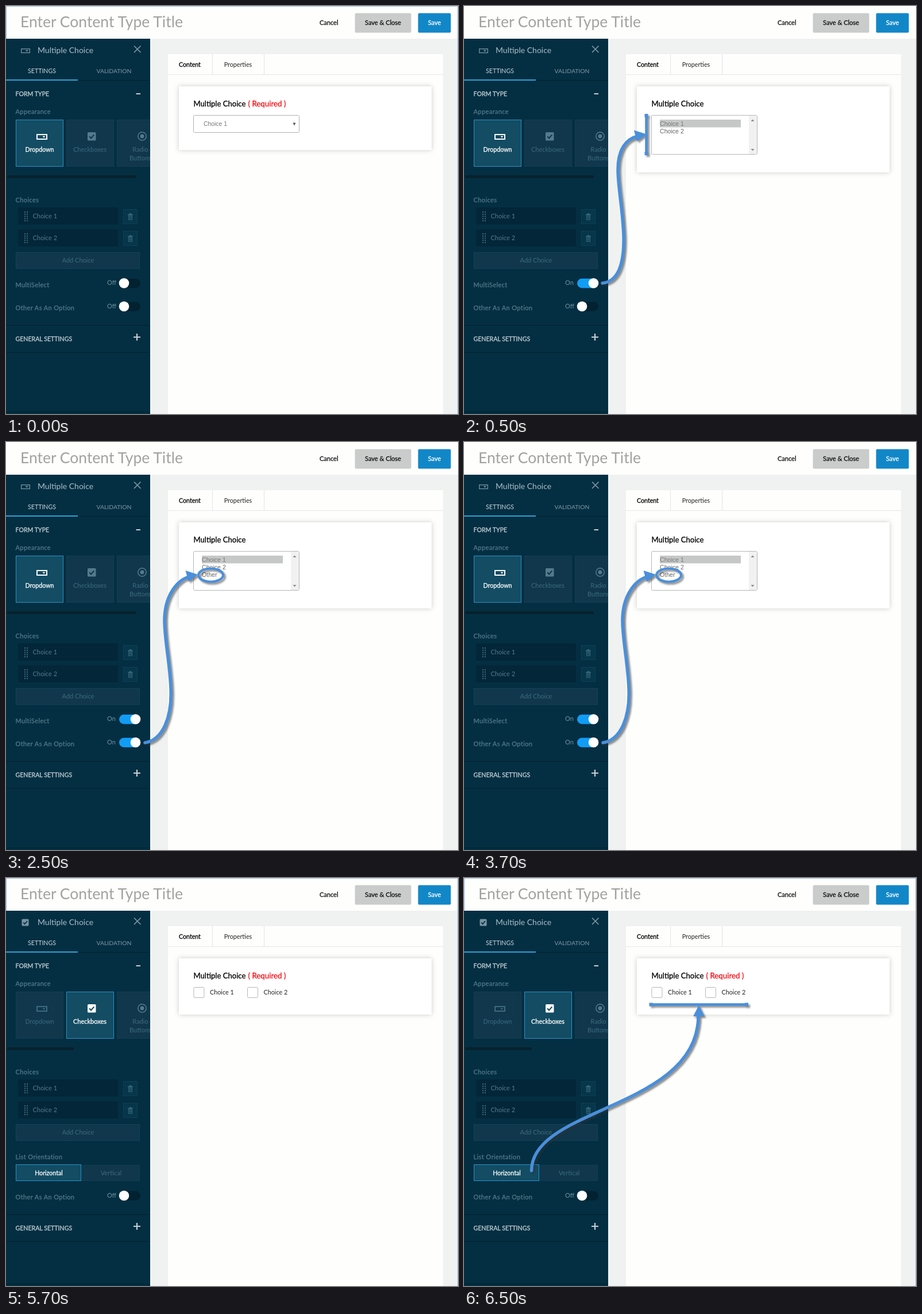
Write an HTML page that moves like this. It is 787x711 px and loops after 8 s.

```html
<!DOCTYPE html>
<html lang="en">
<head>
<meta charset="utf-8">
<title>Multiple choice settings</title>
<style>
html, body { margin: 0; width: 100%; height: 100%; overflow: hidden; background: #f0f2f1; }
svg { display: block; width: 787px; height: 711px; }
text { font-family: Lato, "Open Sans", sans-serif; font-size: 11px; }
.mid { text-anchor: middle; }
.semi { stroke-width: .3px; }
.label { letter-spacing: .4px; fill: #547b8d; stroke: #547b8d; stroke-width: .25px; }
.caps { font-size: 10.6px; }
.arial { font-family: "Liberation Sans", Arial, sans-serif; font-size: 10.6px; }
.mark { fill: none; stroke: #4a8fdb; stroke-width: 5.5; stroke-linecap: round; filter: drop-shadow(3px 3px 1.5px rgba(50, 50, 50, .55)); }
.mark .solid { fill: #4a8fdb; stroke: none; }
.mark .bar { stroke-width: 4.5; }
.card { filter: drop-shadow(0 0 4px rgba(0, 0, 0, .2)); }
</style>
</head>
<body>
<svg id="stage" viewBox="0 0 787 711" xmlns="http://www.w3.org/2000/svg"></svg>
<script>
const stage = document.getElementById('stage');
const starts = [0, 500, 2500, 4500, 6500];
const loop = 8000;

const side = '#042f42', deep = '#032738', tile = '#10374b', dim = '#3d6a80', pale = '#c3d0d6';
const picked = '#134c63', edge = '#2792ca';

const rect = (x, y, w, h, fill, more = '') =>
  `<rect x="${x}" y="${y}" width="${w}" height="${h}" fill="${fill}" ${more}/>`;
const path = (d, stroke, width = 1, fill = 'none') =>
  `<path d="${d}" stroke="${stroke}" stroke-width="${width}" fill="${fill}"/>`;
const text = (x, y, s, fill, cls = '', size = 0) =>
  `<text x="${x}" y="${y}" fill="${fill}" class="${cls}"` +
  (cls.includes('semi') ? ` stroke="${fill}"` : '') +
  (size ? ` style="font-size:${size}px"` : '') + `>${s}</text>`;
const label = (y, s) => text(16.5, y, s, dim, 'label');
// Shown only in the listed scenes
const on = (scenes, body) => `<g data-on="${scenes}">${body}</g>`;

const dropIcon = (x, y, w, h, c, lw) =>
  rect(x, y, w, h, 'none', `stroke="${c}" stroke-width="${lw}"`) +
  `<path d="M${x + w - 7.5} ${y + h / 2 - 1.3}h5l-2.5 3z" fill="${c}"/>`;
const checkIcon = (x, y, s, box, tick) =>
  rect(x, y, s, s, box, 'rx="1.5"') +
  path(`M${x + s * .22} ${y + s * .5}l${s * .2} ${s * .22}l${s * .36} ${-s * .42}`, tick, s / 7);

function tileBox(x, active) {
  return rect(x + .5, 198.5, 82, 81, active ? picked : tile,
    `stroke="${active ? edge : '#133e54'}"`);
}

function tiles(pick) {
  const a = pick === 0, b = pick === 1;
  const ca = a ? '#fff' : dim, cb = b ? '#fff' : dim;
  return tileBox(17, a) + tileBox(105, b) +
    dropIcon(54, 224, 17, 8, ca, 2) +
    text(58.5, 254, 'Dropdown', ca, 'mid' + (a ? ' semi' : ''), 10.7) +
    checkIcon(142, 220, 14.5, b ? '#fff' : '#547b8d', b ? picked : tile) +
    text(146, 254, 'Checkboxes', cb, 'mid' + (b ? ' semi' : '')) +
    rect(2, 295, a ? 224 : 116, 5, '#07212d', 'rx="2"');
}

function choiceRow(y, s) {
  let dots = '';
  for (let i = 0; i < 10; i++)
    dots += rect(32 + i % 2 * 4, y + 7 + (i >> 1) * 3.8, 2, 2, dim);
  return rect(21, y, 174, 30, deep, 'rx="2"') + dots +
    text(46.5, y + 18.5, s, '#547b8d') +
    rect(204.5, y + 3.5, 24, 25, '#06364a', 'stroke="#113e53"') +
    path(`M212 ${y + 12.5}h9M215 ${y + 11}h3`, dim, 1.3) +
    path(`M213.5 ${y + 14}v7.5h6v-7.5zM215.5 ${y + 15}v5M217.5 ${y + 15}v5`, dim, 1);
}

const toggle = (y, state) =>
  text(176, y + 3, state ? 'On' : 'Off', '#6f92a1') +
  rect(197, y - 8, 37, 16.5, state ? '#119df5' : '#022231', 'rx="8.2"') +
  `<circle cx="${state ? 225.5 : 205.5}" cy="${y}" r="8.8" fill="#fefefe"/>`;

const general = y =>
  path(`M0 ${y + .5}H250M0 ${y + 47.5}H250`, '#02202e') +
  text(16.5, y + 28, 'GENERAL SETTINGS', pale, 'caps semi') +
  path(`M222 ${y + 21}h12M228 ${y + 15}v12`, pale, 2.2);

const card = h => rect(301, 140, 440, h, '#fff', 'class="card"');
const arrow = (line, head) => `<path d="${line}"/><path class="solid" d="${head}z"/>`;
const square = (x, y) => rect(x - 3, y - 3, 6, 6, '', 'class="solid"');

const header =
  rect(0, 0, 787, 57, '#fefefd') +
  text(25, 37, 'Enter Content Type Title', '#a2a3a0', '', 26.5) +
  text(546, 33, 'Cancel', '#111', 'semi') +
  rect(607.5, 12.5, 98, 34, '#cacccb', 'rx="2"') +
  text(656.5, 33, 'Save &amp; Close', '#111', 'mid semi') +
  rect(717.5, 12.5, 57, 34, '#1287c8', 'rx="2"') +
  text(746, 33, 'Save', '#fff', 'mid semi');

const main =
  rect(0, 57, 787, 654, '#f0f2f1') +
  rect(281, 84, 480, 627, '#fefefd') +
  rect(280.5, 84, 1, 627, '#e8eae9') +
  path('M281 119.5H761M359.5 84V119M449.5 84V119', '#e3e5e4') +
  rect(281, 119, 79, 1, '#e8eae9') +
  text(320, 105.5, 'Content', '#000', 'mid semi', 10.6) +
  text(404, 105.5, 'Properties', '#222', 'mid', 10.7);

const heading = text(326.5, 175, 'Multiple Choice', '#000', 'semi', 13.1);
const required = text(421.5, 175, '( Required )', '#f20d14', 'semi', 13.3);

const selectBox = card(111) +
  rect(326.5, 190.5, 184, 30, '#fff', 'stroke="#b0b2b1" rx="2"') +
  text(344, 209, 'Choice 1', '#777', 'arial', 10.4) +
  '<path d="M499.5 203.5h5l-2.5 5z" fill="#555"/>';

const listBox = card(150) +
  rect(326.5, 190.5, 184, 68, '#fff', 'stroke="#b5b7b6" rx="2"') +
  rect(496, 191, 14, 67, '#f0f1f0') +
  '<path d="M499.5 201h6l-3-3.5zM499.5 249h6l-3 3.5z" fill="#8b8d8c"/>' +
  rect(341, 198, 141, 13.5, '#c6c8c7') +
  text(341, 208.5, 'Choice 1', '#777', 'arial') +
  text(341, 221.5, 'Choice 2', '#666', 'arial');

const checkItem = (x, s) =>
  rect(x + .5, 190.5, 18, 18, '#fff', 'stroke="#b5b7b6" rx="2"') +
  text(x + 28.5, 203, s, '#222', '', 10.8);

const sidebar =
  rect(0, 57, 251, 654, side) +
  text(55, 82, 'Multiple Choice', '#a9bec7', '', 14) +
  path('M223 69.5l11.5 11.5M234.5 69.5l-11.5 11.5', '#7f98a4', 1.7) +
  text(62.5, 117, 'SETTINGS', '#c7d6dc', 'caps mid') +
  text(188, 117, 'VALIDATION', '#7d99a6', 'caps mid', 10.4) +
  rect(125, 129, 125, 1, '#02202e') +
  rect(0, 128, 125, 2, '#2ba4dc') +
  text(16.5, 157, 'FORM TYPE', pale, 'caps semi') +
  rect(226.5, 152, 7.5, 2, pale) +
  label(187.5, 'Appearance') +
  '<g clip-path="url(#edge)">' + tileBox(193, false) +
  '<circle cx="237" cy="227" r="7.2" fill="none" stroke="#547b8d" stroke-width="1.5"/>' +
  '<circle cx="237" cy="227" r="3.4" fill="#547b8d"/>' +
  text(234, 254, 'Radio', dim, 'mid') + text(234, 269, 'Buttons', dim, 'mid') + '</g>' +
  label(341.5, 'Choices') + choiceRow(351, 'Choice 1') + choiceRow(389, 'Choice 2') +
  rect(17.5, 429.5, 215, 28, tile, 'stroke="#144359"') +
  text(125.5, 446.5, 'Add Choice', dim, 'mid') +
  rect(0, 707, 251, 1, '#02202e');

const dropScenes =
  dropIcon(26.7, 74.7, 14.6, 6.8, '#7693a0', 1.3) + tiles(0) +
  label(489.5, 'MultiSelect') + label(530, 'Other As An Option') + general(556);

const checkScenes =
  checkIcon(27.5, 71.5, 12, '#7693a0', side) + tiles(1) +
  label(489.5, 'List Orientation') +
  rect(132.5, 500.5, 100, 27, tile, 'stroke="#113e53"') +
  rect(17.5, 499.5, 113, 28, picked, `stroke="${edge}"`) +
  text(74.5, 517.5, 'Horizontal', '#fff', 'mid semi', 10.6) +
  text(183, 517.5, 'Vertical', dim, 'mid') +
  label(560, 'Other As An Option') + toggle(553.5, false) + general(586) +
  card(98) + checkItem(326.5, 'Choice 1') + checkItem(420, 'Choice 2');

const listMark = '<g class="mark">' +
  arrow('M241 483C272 480 279 442 278 400C276 350 268 316 268 285C268 250 282 232 302 227',
    'M318 223.5L296 216.5L301 236') +
  '<path class="bar" d="M317.5 191V257"/>' + square(317.5, 191) + square(317.5, 257) + '</g>';

const otherMark = '<g class="mark">' +
  arrow('M242 524C274 519 289 478 287 430C285 382 276 345 276 311C276 270 296 242 318 235',
    'M334 231L312.5 224L318 243.5') +
  '<ellipse cx="356.5" cy="232" rx="21.5" ry="11.5" stroke-width="4"/></g>';

const rowMark = '<g class="mark">' +
  arrow('M117.5 510C117.5 399 408 402 408 240',
    'M409 221.5L399 241L418.5 241') +
  '<path class="bar" d="M325.5 220.5H492"/>' + square(325.5, 220.5) + square(492, 220.5) + '</g>';

stage.innerHTML =
  '<defs><clipPath id="edge"><rect x="0" y="190" width="251" height="100"/></clipPath></defs>' +
  main + header +
  on('034', path('M.5 711V.5H786.5V711', '#9fbdf0')) +
  sidebar +
  on('012', dropScenes) +
  on('0', selectBox + toggle(483, false)) +
  on('12', listBox + toggle(483, true)) +
  on('01', toggle(523.5, false)) +
  on('2', toggle(523.5, true) + text(341, 235, 'Other', '#666', 'arial')) +
  on('34', checkScenes) +
  heading + on('034', required) +
  on('1', listMark) + on('2', otherMark) + on('4', rowMark);

const parts = [...stage.querySelectorAll('[data-on]')];
let shown = -1;

function draw() {
  const t = performance.now() % loop;
  const scene = starts.filter(s => s <= t).length - 1;
  if (scene !== shown) {
    shown = scene;
    for (const p of parts)
      p.style.display = p.dataset.on.includes(scene) ? '' : 'none';
  }
  requestAnimationFrame(draw);
}
draw();
</script>
</body>
</html>
```
